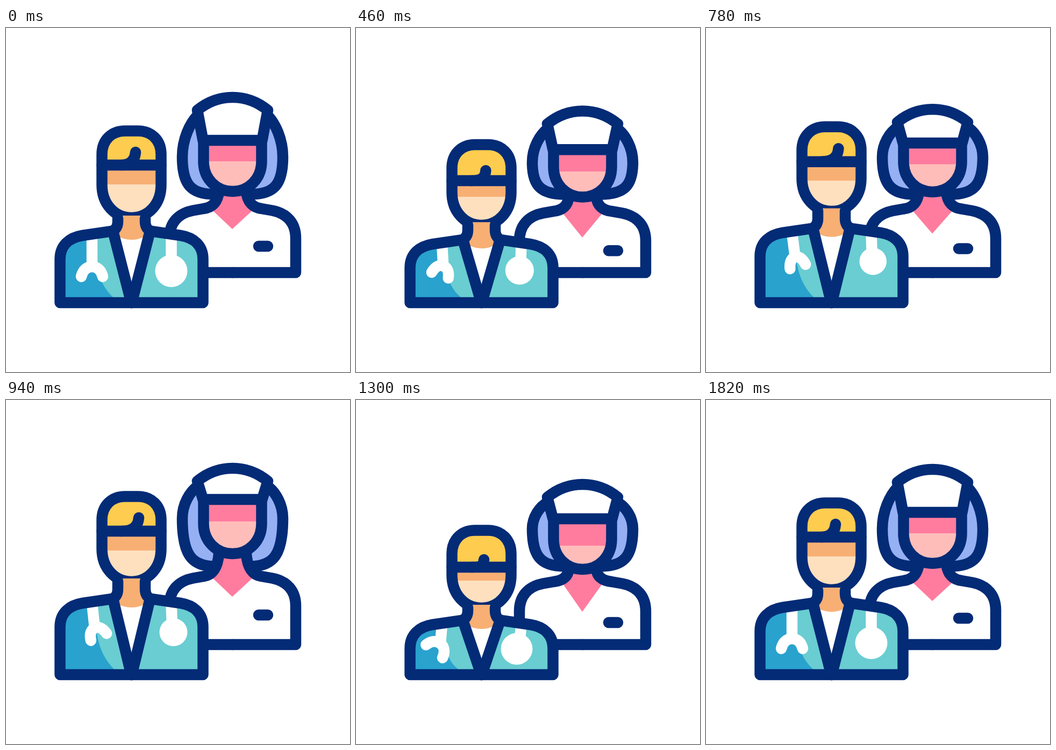
Animation, 640 px wide and 640 px high, one loop 2120 ms. Source, as an HTML page:

```html
<!DOCTYPE html>
<html lang="en">
<head>
<meta charset="utf-8">
<title>Medical staff</title>
<style>
html, body { margin: 0; width: 100%; height: 100%; overflow: hidden; background: #fff; }
svg { display: block; width: 100vw; height: 100vh; }
path { stroke-linecap: round; stroke-linejoin: round; }
</style>
</head>
<body>
<svg id="stage" viewBox="0 0 640 640"></svg>
<script>
const LOOP = 2120, MOVE = 1820, STEP = 20;
const INK = '#042b76', WHITE = '#fff';
const SKIN = '#fee0be', TAN = '#f8af74', BLOND = '#fecc4f', TEAL = '#69cdd1', BLUE = '#29a2ce';
const PINK = '#ff7c9e', ROSE = '#ffbdba', LILAC = '#96b0f4';

// Each track holds its values at the key times and returns to the first one at MOVE.
const doctorTimes = [0, 280, 620, 940, 1300, 1520, MOVE];
const doctorTracks = {
  top: [181, 228, 183, 169, 232, 188],
  brow: [255, 307, 259, 244, 311, 262],
  shade: [291, 333, 293, 280, 336, 297],
  chin: [343, 375, 338, 328, 377, 347],
  neck: [349, 378, 343, 332, 381, 352],
  drop: [0, 30, 1, -8, 32, 3],
  curlX: [241, 238, 245, 247, 238, 241],
  curlY: [231, 292, 236, 219, 297, 239],
  hookX: [160, 158, 166, 165, 157, 159],
  hookY: [444, 453, 431, 424, 453, 444],
  tilt: [0, 35, -1, -24, 38, 0],
  spread: [20, 19, 14.5, 16, 19.5, 20],
  discX: [307.5, 300, 309, 311.5, 299, 306],
  discY: [452, 462, 439, 432, 463, 453],
  discR: [30, 29, 25, 26, 29.5, 30]
};
const nurseTimes = [0, 280, 620, 940, 1020, 1300, 1400, 1520, MOVE];
const nurseTracks = {
  top: [119, 121, 163, 117, 115.5, 147, 151, 144],
  brow: [209, 210, 239.5, 185, 183, 221, 230, 227],
  shade: [248, 251, 279, 226, 225, 271, 277, 273],
  chin: [294, 295, 312, 276, 275, 305, 310, 308],
  drop: [0, 0, 9, -8, -8, 2, 6, 5],
  vee: [374, 377, 399, 366, 366, 394, 398, 394],
  pocket: [406, 406, 421, 400, 400, 414, 417, 415],
  side: [240, 241, 257, 220, 218, 240, 248, 245]
};

// Smooth curve through the keys that never overshoots them.
function curve(times, values) {
  const v = [...values, values[0]];
  const rate = v.slice(1).map((y, i) => (y - v[i]) / (times[i + 1] - times[i]));
  const slope = v.map((_, i) => {
    const a = rate[i - 1], b = rate[i];
    return a * b > 0 ? 2 * a * b / (a + b) : 0;
  });
  return t => {
    let i = 0;
    while (i < rate.length - 1 && t > times[i + 1]) i++;
    const w = times[i + 1] - times[i], u = (t - times[i]) / w, r = 1 - u;
    return r * r * ((1 + 2 * u) * v[i] + u * w * slope[i]) +
           u * u * ((3 - 2 * u) * v[i + 1] - r * w * slope[i + 1]);
  };
}

function rig(times, tracks) {
  const list = Object.entries(tracks).map(([k, v]) => [k, curve(times, v)]);
  return t => Object.fromEntries(list.map(([k, f]) => [k, f(t)]));
}

const doctorAt = rig(doctorTimes, doctorTracks);
const nurseAt = rig(nurseTimes, nurseTracks);

const stage = document.getElementById('stage');
const nodes = [];
let used = 0;

function draw(d, fill, stroke, flip) {
  let p = nodes[used];
  if (!p) {
    p = document.createElementNS('http://www.w3.org/2000/svg', 'path');
    p.setAttribute('fill', fill || 'none');
    if (stroke) {
      p.setAttribute('stroke', stroke);
      p.setAttribute('stroke-width', 20.5);
    }
    if (flip) p.setAttribute('transform', `matrix(-1 0 0 1 ${flip} 0)`);
    nodes.push(stage.appendChild(p));
  }
  p.setAttribute('d', d);
  used++;
}
const fill = (d, color) => draw(d, color);
const line = (d, color = INK) => draw(d, null, color);

// Draws a half and its mirror image around x = axis.
function pair(axis, d, color, stroke) {
  draw(d, color, stroke);
  draw(d, color, stroke, axis * 2);
}

function nurse(n) {
  const mid = 421.5, corner = n.top + 34, hairEnd = 309.5;
  const d = n.side - corner, e = hairEnd - n.side;
  const hair = `M357 ${corner + 9}C342 ${corner + 2 + .25 * d} 328 ${corner + .62 * d} 328 ${n.side}` +
    `C328 ${n.side + .75 * e} 345 ${hairEnd} 388 ${hairEnd}`;
  pair(mid, `${hair}H${mid}V${corner}Z`, LILAC);

  const s = n.chin + 10, y = 336 + n.drop;
  const body = `M396 ${s}C394 ${s + .62 * (y - s)} 384 ${y - 2} 368 ${y}` +
    `L348 ${y + 3.5}C320 ${y + 9} 304 ${y + 27} 304 ${y + 55}V455H${mid}`;
  pair(mid, `${body}V${s}Z`, WHITE);
  fill(`M397 ${s}L384 ${y + 3}L421 ${n.vee}L459 ${y + 3}L446 ${s}Z`, PINK);
  pair(mid, hair, null, INK);
  pair(mid, body, null, INK);
  line(`M470 ${n.pocket}H487`);

  const jaw = n.chin - 46;
  const face = `M367.5 ${n.brow}V${jaw}C367.5 ${jaw + 33} 392 ${s} ${mid} ${s}` +
    `S475.5 ${jaw + 33} 475.5 ${jaw}V${n.brow}`;
  fill(`${face}Z`, ROSE);
  fill(`M367.5 ${n.brow}H475.5V${n.shade}H367.5Z`, PINK);
  line(face);

  const arc = `M356 ${corner}C395 ${n.top + 2} 448 ${n.top + 2} 487 ${corner}`;
  draw(`${arc}L476.5 ${n.brow}H366.5Z`, WHITE, INK);
}

function stethoscope(p) {
  const a = p.tilt * Math.PI / 180, c = Math.cos(a), s = Math.sin(a), w = p.spread;
  const at = (x, y) => `${p.hookX + x * c - y * s} ${p.hookY + x * s + y * c}`;
  line(`M160 ${386 + p.drop}L${at(0, 0)}`, WHITE);
  line(`M${at(-w, 18.5)}C${at(-w * .85, 6)} ${at(-w * .45, 0)} ${at(0, 0)}` +
    `C${at(w * .45, 0)} ${at(w * .85, 6)} ${at(w, 18.5)}`, WHITE);
  line(`M307.5 ${386 + p.drop}L${(307.5 + p.discX) / 2} ${p.discY}`, WHITE);
  const r = p.discR;
  fill(`M${p.discX - r} ${p.discY}a${r} ${r} 0 1 0 ${2 * r} 0a${r} ${r} 0 1 0 ${-2 * r} 0Z`, WHITE);
}

function doctor(p) {
  const mid = 233.5, y = p.drop, chin = p.chin + 10, jaw = p.chin - 51;
  const shoulder = `M100.5 511V${430 + y}C100.5 ${404 + y} 118 ${390 + y} 142 ${386 + y}`;
  const lapel = `M199.5 ${380 + y}L233 511`;

  pair(mid, `${shoulder}L199.5 ${378 + y}L233.5 511Z`, TEAL);
  fill(`${shoulder}L168 ${382 + y}C163 ${436 + .6 * y} ${171 - .1 * y} ${478 + .4 * y} ${204 - .2 * y} 505V511Z`, BLUE);
  fill(`M199.5 ${380 + y}L233.5 511L267.5 ${380 + y}Z`, WHITE);
  stethoscope(p);

  const dome = `V${p.top + 54}C178.5 ${p.top + 27} 197 ${p.top + 10.5} 221 ${p.top + 10.5}` +
    `H246C270 ${p.top + 10.5} 288.5 ${p.top + 27} 288.5 ${p.top + 54}`;
  const head = `M178.5 ${jaw}${dome}V${jaw}C288.5 ${jaw + 35} 265 ${chin} ${mid} ${chin}` +
    `S178.5 ${jaw + 35} 178.5 ${jaw}Z`;
  fill(head, SKIN);
  fill(`M178.5 ${p.brow}${dome}V${p.brow}Z`, BLOND);
  fill(`M178.5 ${p.brow}H288.5V${p.shade}H178.5Z`, TAN);
  line(head);
  line(`M178.5 ${p.brow}H288.5`);
  line(`M215 ${p.brow}C${p.curlX - 9} ${p.brow} ${p.curlX - 1} ${p.curlY + 14} ${p.curlX} ${p.curlY}`);

  fill(`M216 ${p.neck}H251V${368 + y}L262 ${386 + y}Q${mid} ${402 + y} 205 ${386 + y}L216 ${368 + y}Z`, TAN);
  pair(mid, lapel, null, INK);
  pair(mid, `M208 ${p.neck + 5}V${360 + y}C208 ${370 + y} 203 ${376 + y} 197 ${378 + y}L142 ${386 + y}` +
    `C118 ${390 + y} 100.5 ${404 + y} 100.5 ${430 + y}V511H${mid}`, null, INK);
}

function render(now) {
  const t = Math.min(Math.floor(now % LOOP / STEP) * STEP, MOVE);
  used = 0;
  nurse(nurseAt(t));
  doctor(doctorAt(t));
}

const start = performance.now();
function tick() {
  render(performance.now() - start);
  requestAnimationFrame(tick);
}
tick();
</script>
</body>
</html>
```
